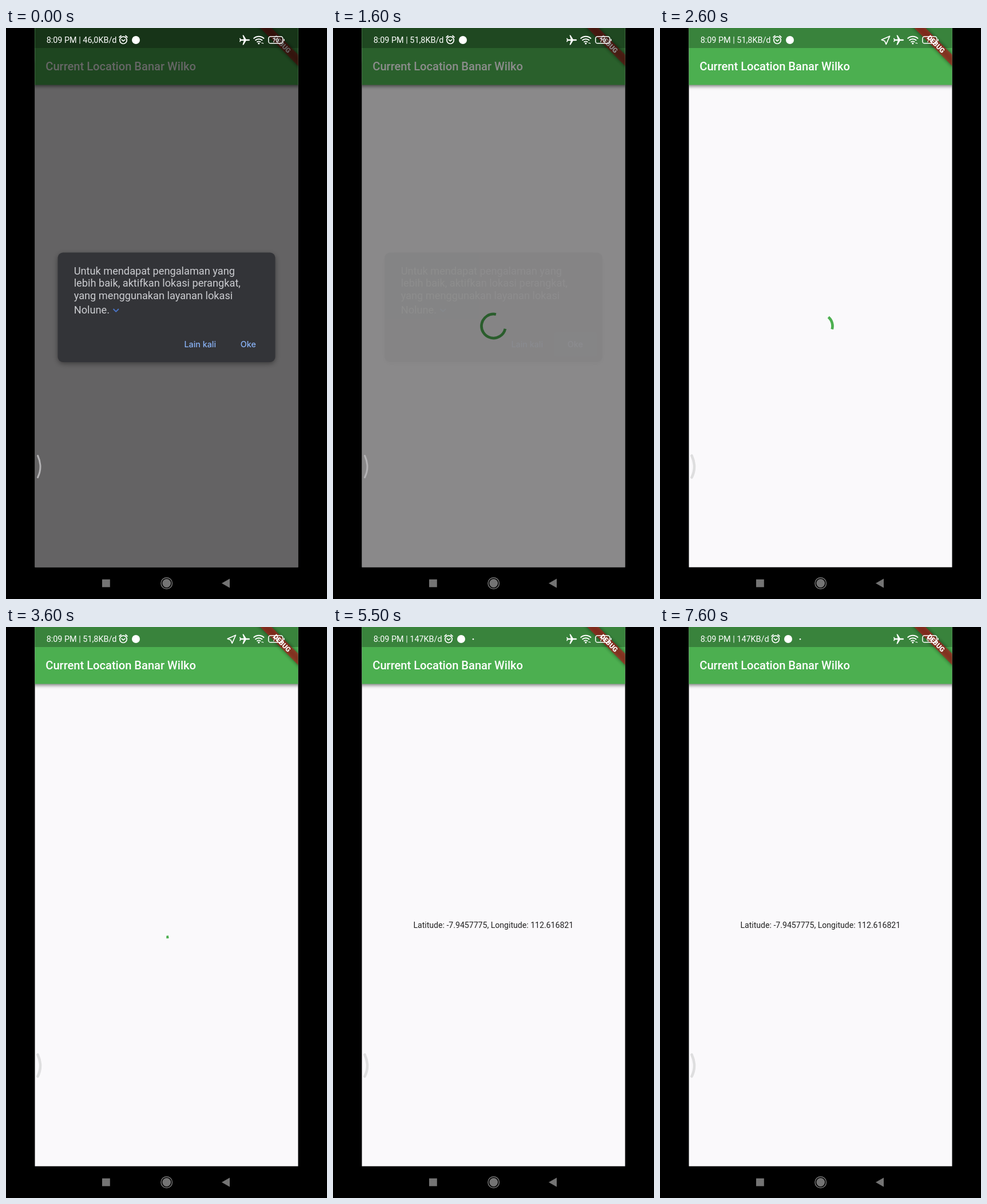
Animation, 561 px wide and 998 px high, one loop 7700 ms. Source, as an HTML page:

```html
<!DOCTYPE html>
<html lang="id">
<head>
<meta charset="utf-8">
<title>Current Location</title>
<style>
  html, body { margin: 0; width: 100%; height: 100%; overflow: hidden; background: #000; }
  svg { display: block; width: 561px; height: 998px; font-family: Roboto, sans-serif; }
</style>
</head>
<body>
<svg viewBox="0 0 561 998" xmlns="http://www.w3.org/2000/svg">
  <defs>
    <clipPath id="screen"><rect x="50.5" width="460" height="942.5"/></clipPath>
    <clipPath id="okBox"><rect x="386" y="532" width="75.5" height="42.5" rx="4"/></clipPath>
    <filter id="soft" x="-20%" y="-40%" width="140%" height="180%"><feGaussianBlur stdDeviation="3"/></filter>
    <filter id="wide" x="-10%" y="-15%" width="120%" height="130%"><feGaussianBlur stdDeviation="5"/></filter>
  </defs>
  <rect width="561" height="998"/>

  <g clip-path="url(#screen)">
    <rect x="50" width="461" height="943" fill="#faf9fb"/>
    <rect x="46" y="60" width="470" height="42" opacity=".5" filter="url(#soft)"/>
    <rect x="50" width="461" height="99.5" fill="#4caf50"/>
    <rect x="50" width="461" height="35" fill="#39833c"/>
    <text x="69.3" y="74" font-size="20.1" font-weight="500" fill="#fff">Current Location Banar Wilko</text>

    <path id="spinner" fill="none" stroke="#4caf50" stroke-width="4.7"/>
    <text id="coords" x="280.3" y="526" font-size="14.1" fill="#212121" text-anchor="middle">Latitude: -7.9457775, Longitude: 112.616821</text>

    <g transform="translate(510.5 0) rotate(45)">
      <rect x="-60" y="32.8" width="120" height="14" opacity=".5" filter="url(#soft)"/>
      <rect x="-60" y="32.8" width="120" height="14" fill="#b71c1c" fill-opacity=".63"/>
      <text y="44" font-size="11.9" font-weight="900" fill="#fff" text-anchor="middle">DEBUG</text>
    </g>

    <rect id="scrim" x="50" width="461" height="943"/>

    <g id="dialog">
      <rect x="91" y="396" width="379" height="190" rx="9" opacity=".45" filter="url(#wide)"/>
      <rect x="90.5" y="392.5" width="380" height="191.5" rx="9" fill="#333438"/>
      <g font-size="18.2" fill="#cbccd0">
        <text x="118.7" y="431">Untuk mendapat pengalaman yang</text>
        <text x="118.7" y="452.3">lebih baik, aktifkan lokasi perangkat,</text>
        <text x="118.7" y="473.6">yang menggunakan layanan lokasi</text>
        <text x="118.7" y="499">Nolune.</text>
      </g>
      <path d="M187.5 491l4.7 4.7 4.7-4.7" fill="none" stroke="#4a73c4" stroke-width="2"/>
      <g clip-path="url(#okBox)" fill="#8ab4f8">
        <rect id="press" x="386" y="532" width="76" height="43"/>
        <circle id="ripple" cx="424" cy="553" opacity=".06"/>
      </g>
      <g font-family="Inter, sans-serif" font-size="14.3" font-weight="500" fill="#8ab4f8">
        <text x="311.5" y="558">Lain kali</text>
        <text id="ok" x="409.8" y="558">Oke</text>
      </g>
    </g>

    <g fill="#fff">
      <text id="clock" x="70.7" y="26.2" font-size="14.4"></text>
      <g id="leftIcons">
        <g fill="none" stroke="#fff" stroke-width="1.7" stroke-linecap="round">
          <circle cx="205" cy="21.3" r="6.2"/>
          <path d="M198 16.2l3-2.7M212 16.2l-3-2.7M202.3 20.3l2.6 2.6 3-2.6"/>
        </g>
        <circle cx="227" cy="21" r="7"/>
      </g>
      <circle id="dot" cx="245" cy="21.3" r="1.3"/>
      <path id="arrow" d="M401.5 14.2L387.2 20.6 392.8 22.8 395.2 28.4Z" fill="none" stroke="#fff" stroke-width="1.7" stroke-linejoin="round"/>
      <path transform="translate(417 21) rotate(90) scale(.9) translate(-11.5 -12)" d="M21 16v-2l-8-5V3.5c0-.83-.67-1.5-1.5-1.5S10 2.67 10 3.5V9l-8 5v2l8-2.5V19l-2 1.5V22l3.5-1 3.5 1v-1.5L13 19v-5.5l8 2.5z"/>
      <g fill="none" stroke="#fff" stroke-width="1.9">
        <path d="M432.6 18.6a13 13 0 0 1 18.4 0M435.5 21.8a9 9 0 0 1 12.6 0M438.4 24.8a5 5 0 0 1 6.8 0"/>
      </g>
      <circle cx="441.8" cy="27" r="1.6"/>
      <path d="M446.3 27l1.1-2 1.1 2zM448.2 26l1.1 2 1.1-2z"/>
      <rect x="458.8" y="15" width="25" height="11.8" rx="3.4" fill="none" stroke="#fff" stroke-width="1.5"/>
      <rect x="485.3" y="19" width="1.5" height="4" rx=".7"/>
      <text id="battery" x="471.2" y="24.6" font-size="9.6" font-weight="500" text-anchor="middle"></text>
    </g>

    <path id="handle" d="M55.5 747.5Q64.5 767 55.5 785.5" fill="none" stroke-linecap="round"/>
  </g>

  <g fill="#747474">
    <rect x="168" y="963.7" width="13.8" height="13.6"/>
    <circle cx="280.7" cy="970.5" r="7.4"/>
    <circle cx="280.7" cy="970.5" r="9.8" fill="none" stroke="#747474" stroke-width="1.5"/>
    <path d="M377 970.5l14-8v16z"/>
  </g>
</svg>
<script>
const LOOP = 7700, STEP = 100;
const OPEN = 1700;      // dialog fully gone
const PRESS = 1100;     // button touched
const FOUND = 5300;     // position shown
const $ = id => document.getElementById(id);
const set = (id, attrs) => { for (const k in attrs) $(id).setAttribute(k, attrs[k]); };
const show = (id, on) => set(id, { visibility: on ? 'visible' : 'hidden' });
const clamp = x => Math.min(1, Math.max(0, x));

// cubic-bezier(.4, 0, .2, 1)
function ease(x) {
  let lo = 0, hi = 1, s = .5;
  for (let i = 0; i < 24; i++) {
    s = (lo + hi) / 2;
    const bx = 1.2 * s * (1 - s) ** 2 + .6 * s * s * (1 - s) + s ** 3;
    if (bx < x) lo = s; else hi = s;
  }
  return 3 * s * s * (1 - s) + s ** 3;
}

function arc(start, sweep) {
  const at = deg => {
    const a = deg * Math.PI / 180;
    return (280.5 + 21 * Math.cos(a)).toFixed(2) + ' ' + (521 + 21 * Math.sin(a)).toFixed(2);
  };
  return `M${at(start)}A21 21 0 ${sweep > 180 ? 1 : 0} 1 ${at(start + sweep)}`;
}

function spinner(t) {
  if (t < OPEN) return arc(13, 269);
  const dt = t - OPEN, p = (dt / 1333 + .45) % 1;
  const head = 270 * ease(clamp(p * 2)), tail = 270 * ease(clamp(p * 2 - 1));
  return arc(154 + 360 * dt / 2222 + 90 * p + tail, Math.max(head - tail, .1));
}

function draw(t) {
  const fading = t >= 1600, open = t >= OPEN, late = t >= 5100;

  set('scrim', { opacity: open ? 0 : fading ? .45 : .6 });
  set('dialog', { opacity: open ? 0 : fading ? .05 : 1 });
  const press = clamp((t - PRESS) / 300);
  set('press', { opacity: .11 * press });
  set('ripple', { r: 45 * press, opacity: .06 * (1 - press) });
  set('ok', { fill: press > .5 ? '#adc6f2' : '#8ab4f8' });

  show('spinner', fading && t < FOUND);
  set('spinner', { d: spinner(t) });
  show('coords', t >= FOUND);

  const speed = late ? '147' : t >= PRESS ? '51,8' : '46,0';
  $('clock').textContent = `8:09 PM | ${speed}KB/d`;
  set('leftIcons', { transform: `translate(${late ? -3 : 0} 0)` });
  show('dot', late);
  show('arrow', t >= 2600 && t < 5500);
  $('battery').textContent = t >= 6900 ? '69' : '70';

  show('handle', !open || t >= OPEN + STEP);
  set('handle', { stroke: open ? '#dededf' : '#b4b3b5', 'stroke-width': open ? 4.6 : 3 });
}

const began = performance.now();
function tick() {
  const t = (performance.now() - began) % LOOP;
  draw(Math.floor(t / STEP) * STEP);
  requestAnimationFrame(tick);
}
tick();
</script>
</body>
</html>
```
